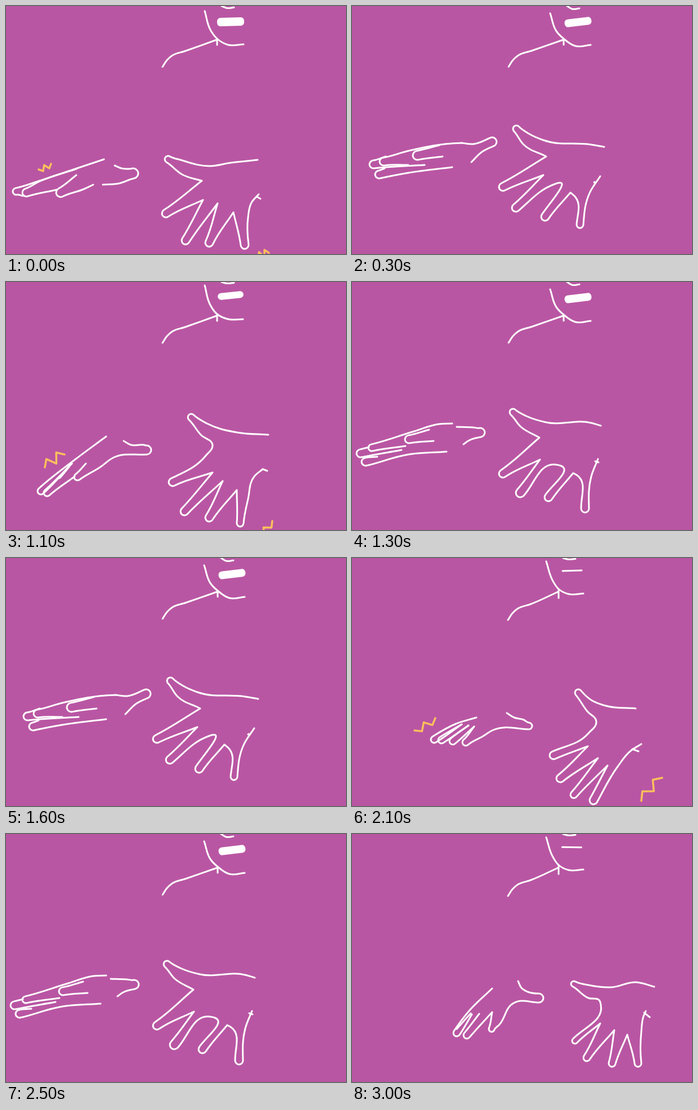
An HTML page with a canvas that plays this animation: 604x440 px, repeating every 3.3 s.

```html
<!DOCTYPE html>
<html lang="en">
<head>
<meta charset="utf-8">
<title>Gesturing hands</title>
<style>
html, body { margin: 0; width: 100%; height: 100%; overflow: hidden; background: #b956a3; }
canvas { display: block; width: 604px; height: 440px; }
</style>
</head>
<body>
<canvas id="stage" width="604" height="440"></canvas>
<script>
const ctx = document.getElementById('stage').getContext('2d');
const mix = (a, b, k) => a + (b - a) * k;
const dist = (a, b) => Math.hypot(b.x - a.x, b.y - a.y) || 1e-6;
const unit = (a, b) => ({ x: (b.x - a.x) / dist(a, b), y: (b.y - a.y) / dist(a, b) });

// Key points: "x,y" is passed smoothly, "x,y!" is a corner,
// "x,y@r" is the centre of a round fingertip of radius r.
const parse = text => text.split(' ').map(item => {
  const [x, y, r = 0] = item.split(/[,@]/).map(parseFloat);
  return { x, y, r, sharp: item.endsWith('!') };
});

// Replaces each fingertip by a half circle that points away from its neighbours.
function roundTips(points) {
  return points.flatMap((tip, i) => {
    if (!tip.r) return [tip];
    const a = points[i - 1], b = points[i + 1];
    const axis = unit({ x: (a.x + b.x) / 2, y: (a.y + b.y) / 2 }, tip);
    const side = (a.x - b.x) * -axis.y + (a.y - b.y) * axis.x < 0 ? -1 : 1;
    const normal = { x: -axis.y * side, y: axis.x * side };
    return [0, 1, 2].map(step => {
      const cos = Math.cos(step * Math.PI / 2), sin = Math.sin(step * Math.PI / 2);
      return {
        x: tip.x + tip.r * (normal.x * cos + axis.x * sin),
        y: tip.y + tip.r * (normal.y * cos + axis.y * sin),
        dir: { x: axis.x * cos - normal.x * sin, y: axis.y * cos - normal.y * sin }
      };
    });
  });
}

function direction(points, i, chord) {
  const p = points[i], a = points[i - 1], b = points[i + 1];
  if (p.dir) return p.dir;
  if (p.sharp || !a || !b) return chord;
  const before = unit(a, p), after = unit(p, b);
  const la = dist(a, p), lb = dist(p, b);
  return unit({ x: 0, y: 0 }, { x: before.x * lb + after.x * la, y: before.y * lb + after.y * la });
}

function strokeCurve(keys) {
  const points = roundTips(keys);
  ctx.beginPath();
  ctx.moveTo(points[0].x, points[0].y);
  for (let i = 0; i < points.length - 1; i++) {
    const a = points[i], b = points[i + 1];
    const chord = unit(a, b), reach = dist(a, b) * 0.37;
    const from = direction(points, i, chord), to = direction(points, i + 1, chord);
    ctx.bezierCurveTo(a.x + from.x * reach, a.y + from.y * reach,
      b.x - to.x * reach, b.y - to.y * reach, b.x, b.y);
  }
  ctx.stroke();
}

// mouth: x, y, width, height, tilt. Each spark: x1, y1, x2, y2, swing.
const makePose = ({ chin, mouth, hands, sparks = [] }) =>
  ({ chin: parse(chin), mouth, hands: hands.map(parse), sparks });

const mixPoints = (a, b, k) => a.map((p, i) => ({
  x: mix(p.x, b[i].x, k), y: mix(p.y, b[i].y, k), r: mix(p.r, b[i].r, k), sharp: p.sharp
}));
const mixNumbers = (a, b, k) => a.map((n, i) => mix(n, b[i], k));

const mixPose = (a, b, k) => ({
  chin: mixPoints(a.chin, b.chin, k),
  mouth: mixNumbers(a.mouth, b.mouth, k),
  hands: a.hands.map((line, i) => mixPoints(line, b.hands[i], k)),
  sparks: a.sparks.map((spark, i) => mixNumbers(spark, b.sparks[i], k))
});

const calmChin = '345,6 357,41 367,55 385,64 411,63';
const talking = { chin: '352,13 364,46 376,58 397,71 424,69', mouth: [401.5, 28.5, 48, 14, -0.12] };

const rest = makePose({
  chin: calmChin,
  mouth: [390.5, 23.5, 37, 3, 0.02],
  hands: [
    '295,261 301,273 315,281 332,291@8 287,300 262,338 248,346@5 249,316! 204,357@6 226,319',
    '249,274 207,315 186,353@6 213,320',
    '211,318 186,346',
    '537,271 505,263 460,272 420,268 394,266@5 420,291 440,296 442,303 396,367@5 441,336! 417,397@6 466,348! 462,407@6 489,356! 508,407@6 514,350 518,323 522,314',
    '519,317 529,325'
  ]
});

const gather = makePose({
  chin: calmChin,
  mouth: [391, 22.5, 37, 3, -0.03],
  hands: [
    '275,275 288,283 305,287 314,298@6 249,306 233,316 202,327@6 217,299',
    '221,283 185,294 146,322@6 195,295',
    '195,295 159,323@6 207,297',
    '207,297 179,325@6 217,299',
    '504,267 450,262 425,252 402,239@6 418,272 434,290 420,311 358,350@7 419,334! 370,391@7 437,355! 394,420@6 454,368! 429,430@7 472,370 494,343 514,330',
    '498,339 509,343'
  ],
  sparks: [[111, 306, 148, 284, 8], [514, 431, 551, 390, -10]]
});

const spread = makePose({
  chin: '353,6 363,41 375,57 395,66 421,66',
  mouth: [399, 24, 46, 12, -0.1],
  hands: [
    '209,282 222,289 245,289 250,298@8 190,312 168,328 127,346@6 142,322',
    '178,274 120,317 62,371@6 117,322',
    '117,322 73,374@6 122,345',
    '117,322 95,347@1 112,328',
    '466,271 411,267 357,251 329,240@6 346,271 367,290 355,308 296,355@7 367,338! 317,407@7 385,353! 361,418@7 410,369! 416,428@6 430,385 441,345 456,332',
    '456,332 464,335'
  ],
  sparks: [[69, 329, 104, 306, -11], [447, 452, 473, 424, 7]]
});

const turn = makePose({
  chin: '353,9 364,44 375,58 395,69 422,68',
  mouth: [399, 28, 48, 15, -0.03],
  hands: [
    '193,283 205,288 226,297@9 200,315 172,317',
    '174,272 120,290 60,310 18,329@6 30,337',
    '125,289 60,311 36,331@7 90,326',
    '125,300 97,331@8 138,325 155,317',
    '447,273 400,278 362,284 310,273 288,272@6 315,300 348,310! 284,368@7 350,344! 319,416@7 376,350! 361,420@7 404,366! 424,424@7 430,375 436,349 449,334',
    '445,338 452,342'
  ],
  sparks: [[58, 290, 80, 280, 6], [448, 446, 467, 438, -8]]
});

const offer = makePose({
  ...talking,
  hands: [
    '186,257 215,258 228,267@8 208,281 198,288',
    '178,251 155,252 110,265 35,294@6 95,291',
    '137,262 101,279@7 145,282',
    '30,293 15,304@7 88,298',
    '45,310 24,319@7 100,306 168,301',
    '442,255 425,250 345,249 310,238 286,231@6 300,257 333,276! 268,340@7 334,315! 299,374@8 362,324 371,326 349,382@7 393,339! 400,343 414,402@7 425,345 437,314',
    '432,318 438,320'
  ]
});

const lift = makePose({
  ...talking,
  hands: [
    '195,243 215,245 249,241@8 232,258 212,277',
    '195,243 165,245 100,257 56,276@7 100,282',
    '155,247 116,265@8 161,267',
    '60,267 38,281@7 129,282',
    '58,288 48,299@7 100,296 178,286',
    '448,250 425,246 340,238 315,227 292,218@6 305,246 345,267! 268,321@7 340,300! 291,358@7 360,316 366,314 343,374@7 388,331! 396,338 405,388@6 422,332 441,302',
    '430,313 431,312'
  ]
});

const cycle = [turn, offer, mixPose(offer, lift, 0.5), lift,
  rest, gather, mixPose(gather, spread, 0.5), spread];

// Hold of each successive step of the cycle, in tenths of a second.
const holds = [1, 1, 1, 4, 2, 1, 1, 1, 1, 2, 1, 3, 2, 1, 1, 1, 1, 2, 1, 2, 3];
const LOOP = holds.reduce((sum, n) => sum + n) * 100;

function poseAt(time) {
  let step = 0;
  while (time >= holds[step] * 100) time -= holds[step++] * 100;
  return cycle[step % cycle.length];
}

function drawHead({ chin, mouth }) {
  const [brow, , jaw] = chin;
  const sag = (375 - jaw.x) / 4, depth = brow.y * 0.4;
  strokeCurve(chin);
  strokeCurve([jaw, { x: jaw.x, y: 69 + sag }]);
  strokeCurve(parse('318,80 295,88 286,96 278,108').reduce(
    (line, p) => [...line, { x: p.x - sag / 2, y: p.y + sag }], [{ x: jaw.x - 1, y: 60 }]));
  strokeCurve([{ x: brow.x + 30, y: 0 }, { x: brow.x + 39, y: depth }, { x: brow.x + 52, y: depth - 1 }]);

  const [x, y, width, height, tilt] = mouth;
  ctx.save();
  ctx.translate(x, y);
  ctx.rotate(tilt);
  ctx.beginPath();
  ctx.roundRect(-width / 2, -height / 2, width, height, Math.min(height / 2, 6));
  ctx.fill();
  ctx.restore();
}

function drawSpark([x1, y1, x2, y2, swing]) {
  const along = unit({ x: x1, y: y1 }, { x: x2, y: y2 });
  ctx.beginPath();
  [0, swing, -swing / 2, swing, 0].forEach((off, i) =>
    ctx.lineTo(mix(x1, x2, i / 4) - along.y * off, mix(y1, y2, i / 4) + along.x * off));
  ctx.stroke();
}

function draw(pose) {
  ctx.fillStyle = '#b956a3';
  ctx.fillRect(0, 0, 604, 440);
  ctx.lineCap = ctx.lineJoin = 'round';
  ctx.lineWidth = 3;
  ctx.strokeStyle = ctx.fillStyle = '#fff';
  drawHead(pose);
  pose.hands.forEach(strokeCurve);
  ctx.lineWidth = 3.5;
  ctx.strokeStyle = '#fcc05c';
  pose.sparks.forEach(drawSpark);
}

const start = performance.now();
function tick() {
  draw(poseAt(Math.max(0, performance.now() - start) % LOOP));
  requestAnimationFrame(tick);
}
tick();
</script>
</body>
</html>
```
